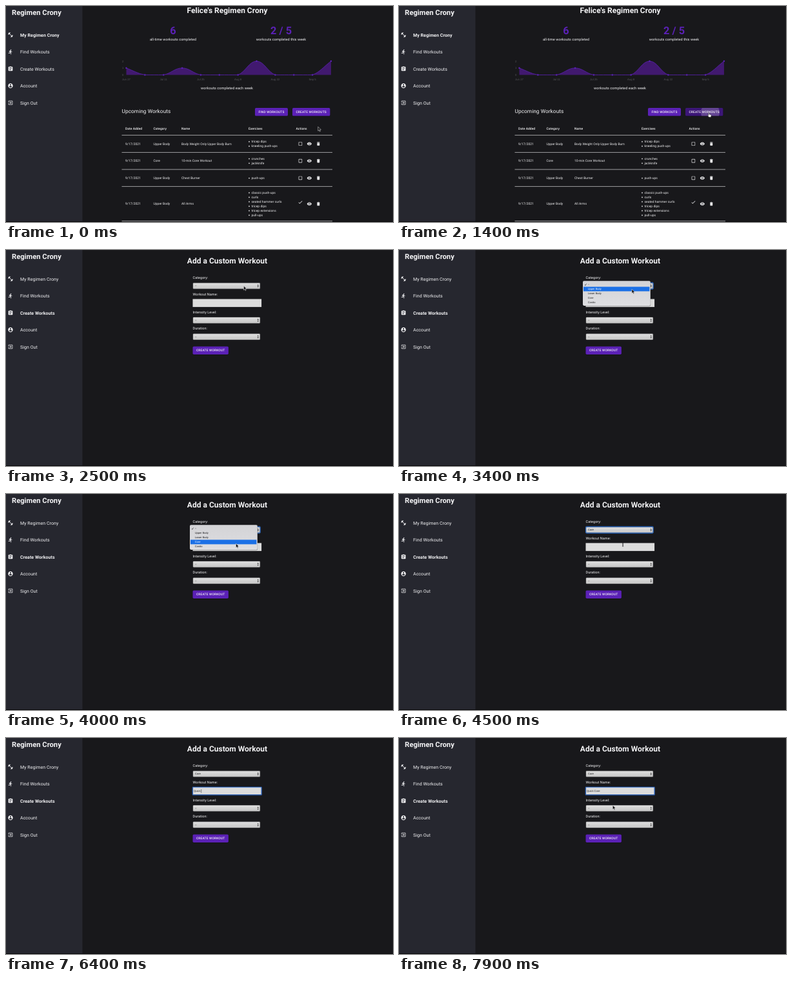
Animation, 600 px wide and 337 px high, one loop 8 s. Source, as an HTML page:

```html
<!DOCTYPE html>
<html lang="en">
<head>
<meta charset="utf-8">
<title>Regimen Crony</title>
<style>
  html, body { margin: 0; width: 100%; height: 100%; overflow: hidden; background: #18181b; }
  svg { display: block; width: 100vw; height: 100vh; }
  text { font-family: Roboto, sans-serif; fill: #f4f4f6; letter-spacing: .0094em; text-rendering: geometricPrecision; white-space: pre; }
  .bold { font-weight: 700; letter-spacing: 0; }
  .item.on { font-weight: 700; }
  .head { font-weight: 500; }
  .mid { text-anchor: middle; }
  .stat { font-weight: 700; fill: #5b21b6; letter-spacing: 0; text-anchor: middle; }
  .btn { font-weight: 500; letter-spacing: .0286em; text-anchor: middle; }
  .tick { font-family: "Liberation Sans", Arial, sans-serif; fill: #56565b; letter-spacing: 0; text-anchor: middle; }
  .ui { font-family: "Liberation Sans", Arial, sans-serif; fill: #1c1c1e; letter-spacing: 0; }
  .ui.pick { fill: #fff; }
</style>
</head>
<body>
<svg id="stage" viewBox="0 0 600 337" preserveAspectRatio="none">
  <defs>
    <linearGradient id="gray" x2="0" y2="1"><stop stop-color="#dfdfdf"/><stop offset="1" stop-color="#c6c6c6"/></linearGradient>
    <linearGradient id="panel" x2="0" y2="1"><stop stop-color="#d3d3d6"/><stop offset="1" stop-color="#dedee1"/></linearGradient>
    <clipPath id="btnClip"><rect x="444" y="159" width="58.4" height="12.6" rx="1.7"/></clipPath>
  </defs>
  <rect width="600" height="337" fill="#18181b"/>
  <rect width="118.5" height="337" fill="#26272f"/>
  <g id="side"></g>
  <g id="dash"></g>
  <g id="form"></g>
  <rect y="336" width="600" height="1" fill="#09090b"/>
  <rect id="scroll" x="599" y="8" width="1" height="328" fill="#424246"/>
  <g id="cursor">
    <path id="arrow" d="M0 0V6.4L1.5 5.1 2.5 7.4 3.6 6.9 2.6 4.6H4.6Z" fill="#0c0c0e" stroke="#e4e4e6" stroke-width=".55"/>
    <path id="hand" d="M-.6 .3Q0-.5.6.3V2.4L3 2.9Q3.9 3.2 3.8 4.2L3.2 6.9H.1L-1.9 4.2Q-2 3.3-.6 4Z" fill="#f2f2f4" stroke="#111" stroke-width=".45"/>
    <path id="beam" d="M-1.1-2.7Q0-2.7 0-2V2Q0 2.7-1.1 2.7M1.1-2.7Q0-2.7 0-2V2Q0 2.7 1.1 2.7" fill="none" stroke="#1b1b1d" stroke-width=".6"/>
  </g>
</svg>
<script>
const $ = id => document.getElementById(id);
const text = (x, mid, size, str, cls = '', id = '') =>
  `<text x="${x}" y="${mid + size * .36}" font-size="${size}" class="${cls}" id="${id}">${str}</text>`;
const rect = (x, y, w, h, fill, more = '') =>
  `<rect x="${x}" y="${y}" width="${w}" height="${h}" fill="${fill}" ${more}/>`;
const icon = (d, x, y, size) =>
  `<path d="${d}" fill="#f4f4f6" transform="translate(${x - size / 2} ${y - size / 2}) scale(${size / 24})"/>`;
const button = (x, y, w, label, id = '') =>
  rect(x, y + .6, w, 12.6, '#0d0d10', 'rx="1.7" opacity=".6"') +
  rect(x, y, w, 12.6, '#5b21b6', `rx="1.7" id="${id}"`) +
  text(x + w / 2, y + 6.3, 4.92, label, 'btn');

const icons = {
  gym: 'M20.57 14.86L22 13.43 20.57 12 17 15.57 8.43 7 12 3.43 10.57 2 9.14 3.43 7.71 2 5.57 4.14 4.14 2.71 2.71 4.14l1.43 1.43L2 7.71l1.43 1.43L2 10.57 3.43 12 7 8.43 15.57 17 12 20.57 13.43 22l1.43-1.43L16.29 22l2.14-2.14 1.43 1.43 1.43-1.43-1.43-1.43L22 16.29z',
  run: 'M13.49 5.48c1.1 0 2-.9 2-2s-.9-2-2-2-2 .9-2 2 .9 2 2 2zm-3.6 13.9l1-4.4 2.1 2v6h2v-7.5l-2.1-2 .6-3c1.3 1.5 3.3 2.5 5.5 2.5v-2c-1.9 0-3.5-1-4.3-2.4l-1-1.6c-.4-.6-1-1-1.7-1-.3 0-.5.1-.8.1l-5.2 2.2v4.7h2v-3.4l1.8-.7-1.6 8.1-4.9-1-.4 2 7 1.4z',
  list: 'M19 3h-4.18C14.4 1.84 13.3 1 12 1c-1.3 0-2.4.84-2.82 2H5c-1.1 0-2 .9-2 2v14c0 1.1.9 2 2 2h14c1.1 0 2-.9 2-2V5c0-1.1-.9-2-2-2zm-7 0c.55 0 1 .45 1 1s-.45 1-1 1-1-.45-1-1 .45-1 1-1zm2 14H7v-2h7v2zm3-4H7v-2h10v2zm0-4H7V7h10v2z',
  user: 'M12 2C6.48 2 2 6.48 2 12s4.48 10 10 10 10-4.48 10-10S17.52 2 12 2zm0 3c1.66 0 3 1.34 3 3s-1.34 3-3 3-3-1.34-3-3 1.34-3 3-3zm0 14.2c-2.5 0-4.71-1.28-6-3.22.03-1.99 4-3.08 6-3.08 1.99 0 5.97 1.09 6 3.08-1.29 1.94-3.5 3.22-6 3.22z',
  exit: 'M10.09 15.59L11.5 17l5-5-5-5-1.41 1.41L12.67 11H3v2h9.67l-2.58 2.59zM19 3H5c-1.11 0-2 .9-2 2v4h2V5h14v14H5v-4H3v4c0 1.1.89 2 2 2h14c1.1 0 2-.9 2-2V5c0-1.1-.9-2-2-2z',
  eye: 'M12 4.5C7 4.5 2.73 7.61 1 12c1.73 4.39 6 7.5 11 7.5s9.27-3.11 11-7.5c-1.73-4.39-6-7.5-11-7.5zM12 17c-2.76 0-5-2.24-5-5s2.24-5 5-5 5 2.24 5 5-2.24 5-5 5zm0-8c-1.66 0-3 1.34-3 3s1.34 3 3 3 3-1.34 3-3-1.34-3-3-3z',
  bin: 'M6 19c0 1.1.9 2 2 2h8c1.1 0 2-.9 2-2V7H6v12zM19 4h-3.5l-1-1h-5l-1 1H5v2h14V4z',
  box: 'M19 5v14H5V5h14m0-2H5c-1.1 0-2 .9-2 2v14c0 1.1.9 2 2 2h14c1.1 0 2-.9 2-2V5c0-1.1-.9-2-2-2z',
  tick: 'M9 16.17L4.83 12l-1.42 1.41L9 19 21 7l-1.41-1.41z'
};

// Sidebar
const menu = [['gym', 'My Regimen Crony'], ['run', 'Find Workouts'], ['list', 'Create Workouts'], ['user', 'Account'], ['exit', 'Sign Out']];
$('side').innerHTML = text(9, 10.2, 11.2, 'Regimen Crony', 'bold') + menu.map(([name, label], i) => {
  const y = 45 + i * 26.5;
  return icon(icons[name], 7, y, 8.8) + text(22, y, 7, label, 'item', 'item' + i);
}).join('');

// Weekly chart: smooth curve whose handles never leave the plot
function chart() {
  const pts = [1, 0, 0, 1, 0, 0, 0, 2, 0, 0, 0, 2].map((v, i) => [186.5 + i * 28.86, 107.5 - v * 10.7]);
  const at = i => pts[Math.max(0, Math.min(pts.length - 1, i))];
  const handle = (i, dir) => {
    const a = at(i - 1), b = at(i + 1), p = pts[i];
    const k = (a === p || b === p ? .4 : .2) * dir;
    return [p[0] + k * (b[0] - a[0]), Math.min(107.5, Math.max(86, p[1] + k * (b[1] - a[1])))];
  };
  let d = 'M' + pts[0];
  for (let i = 1; i < pts.length; i++) d += `C${handle(i - 1, 1)} ${handle(i, -1)} ${pts[i]}`;
  const days = ['Jun 27', 'Jul 11', 'Jul 25', 'Aug 8', 'Aug 22', 'Sep 5'];
  return `<path d="${d}V107.5H186.5Z" fill="#41196f"/><path d="${d}" fill="none" stroke="#5420a3" stroke-width=".9"/>` +
    pts.map(p => `<circle cx="${p[0]}" cy="${p[1]}" r="1.25" fill="#5b21b6"/>`).join('') +
    days.map((day, i) => text(186.5 + i * 57.72, 114, 4.3, day, 'tick')).join('') +
    [0, 1, 2].map(v => text(181.3, 107.5 - v * 10.7, 4.3, v, 'tick')).join('');
}

// Table
const rows = [
  [215, 'Upper Body', 'Body Weight Only Upper Body Burn', ['tricep dips', 'kneeling push-ups']],
  [241.6, 'Core', '10-min Core Workout', ['crunches', 'jackknife']],
  [268.4, 'Upper Body', 'Chest Burner', ['push-ups']],
  [308.7, 'Upper Body', 'All Arms', ['classic push-ups', 'curls', 'seated hammer curls', 'tricep dips', 'tricep extensions', 'pull-ups']]
];
const row = ([y, kind, name, moves], i) =>
  text(185, y, 4.95, '9/17/2021') + text(228.5, y, 4.95, kind) + text(272, y, 4.95, name) +
  moves.map((move, k) => {
    const my = y + (k - (moves.length - 1) / 2) * 7;
    return `<circle cx="377" cy="${my + .2}" r=".85" fill="#f4f4f6"/>` + text(380.4, my, 4.95, move);
  }).join('') +
  (i === 3 ? icon(icons.tick, 456.4, y - 2.5, 8.2) : icon(icons.box, 456.4, y, 7.4)) +
  icon(icons.eye, 470.3, y, 7.8) + icon(icons.bin, 484.3, y, 7.6);

$('dash').innerHTML =
  text(343, 6.6, 12, "Felice's Regimen Crony", 'bold mid') +
  text(259, 38.5, 16.4, '6', 'stat') + text(426.5, 38.5, 16.4, '2 / 5', 'stat') +
  text(259, 52.3, 5.6, 'all-time workouts completed', 'mid') +
  text(426.5, 52.3, 5.6, 'workouts completed this week', 'mid') +
  chart() +
  text(342.5, 128.3, 5.65, 'workouts completed each week', 'mid') +
  text(179.5, 164.3, 8.25, 'Upcoming Workouts') +
  button(386, 159, 51, 'FIND WORKOUTS') + button(444, 159, 58.4, 'CREATE WORKOUTS', 'create') +
  '<circle id="ripple" cx="482.5" cy="166" fill="#fff" opacity=".2" clip-path="url(#btnClip)"/>' +
  [[185, 'Date Added'], [228.5, 'Category'], [272, 'Name'], [376, 'Exercises'], [449.5, 'Actions']]
    .map(([x, label]) => text(x, 191.5, 4.95, label, 'head')).join('') +
  [201.7, 228.3, 255, 281.7, 335.4].map(y => rect(179.5, y - .35, 326.5, .7, '#d4d4d6')).join('') +
  rows.map(row).join('');

// Form
const select = (y, id = '') =>
  rect(290, y - 4.6, 103.8, 9.2, 'url(#gray)', 'rx="1" stroke="#8d8d90" stroke-width=".4"') +
  text(293, y, 4.1, '--', 'ui', id) +
  `<path d="M389.6 ${y - .6}l1.1-1.7 1.1 1.7zm0 1.2l1.1 1.7 1.1-1.7z" fill="#1c1c1e"/>`;
const options = ['--', 'Upper Body', 'Lower Body', 'Core', 'Cardio'];
const optTop = 50.4, optH = 7;

$('form').innerHTML =
  text(343, 17, 12, 'Add a Custom Workout', 'bold mid') +
  [[43, 'Category:'], [68.6, 'Workout Name:'], [96.8, 'Intensity Level:'], [122.4, 'Duration:']]
    .map(([y, label]) => text(289.5, y, 5.5, label)).join('') +
  select(56, 'category') + select(109.6) + select(135.4) +
  rect(289.6, 51, 104.6, 10, 'none', 'id="selRing" rx="1.4" stroke="#2d66b8" stroke-width="1.3"') +
  rect(289.5, 76.5, 106.6, 12.4, '#dcdcdc') +
  rect(289.4, 76.6, 106.8, 12.2, 'none', 'id="inRing" rx=".8" stroke="#2d5fb0" stroke-width="1.4"') +
  text(291, 82.8, 4.1, '', 'ui', 'typed') +
  rect(291, 80, .5, 5.6, '#222', 'id="caret"') +
  button(289.5, 150.4, 55.4, 'CREATE WORKOUT') +
  '<g id="drop">' +
  rect(284.6, 48.6, 105.6, 39.2, '#000', 'rx="2" opacity=".35"') +
  rect(285, 48.3, 104.8, 38.6, 'url(#panel)', 'rx="1.8"') +
  rect(286, optTop, 102.4, optH, '#1b70e6', 'id="hilite"') +
  '<path id="check" d="M288 54l.9 1.3 1.7-2.8" fill="none" stroke="#1c1c1e" stroke-width=".6"/>' +
  options.map((o, i) => text(292.7, optTop + optH * (i + .5), 4, o, 'ui', 'opt' + i)).join('') +
  '</g>';

// Pointer stops: time, x, y
const path = [
  [0, 483.8, 188.4], [500, 483.5, 178], [900, 481.2, 169], [1400, 480.4, 166.6], [2000, 480.4, 166.8],
  [2100, 428, 115], [2200, 377, 70], [2300, 377, 70], [2400, 372, 62], [2500, 368.5, 56], [2700, 368, 55.4],
  [3200, 362, 60.4], [3400, 361, 61.2], [4000, 356.5, 77.3], [4300, 355.5, 77.3], [4800, 334.5, 82],
  [7500, 334.5, 82], [7600, 336, 84], [7900, 331.3, 105], [8000, 331.3, 105]
];
const keys = [5600, 5800, 6000, 6200, 6300, 6400, 6700, 7100, 7300, 7400];
const word = 'Quick Core';

function pointer(t) {
  const i = path.findIndex(p => p[0] > t);
  const [t0, x0, y0] = path[i - 1], [t1, x1, y1] = path[i];
  const k = (t - t0) / (t1 - t0);
  return [x0 + (x1 - x0) * k, y0 + (y1 - y0) * k];
}
const show = (id, on) => $(id).style.display = on ? '' : 'none';

function draw(t) {
  const home = t < 1500, [x, y] = pointer(t);
  show('dash', home);
  show('form', !home);
  show('scroll', !home && t < 2200);
  $('item0').classList.toggle('on', home);
  $('item2').classList.toggle('on', !home);

  const hover = home && y < 171.6;
  $('create').setAttribute('fill', hover ? '#3c1678' : '#5b21b6');
  $('ripple').setAttribute('r', home && t >= 1300 ? 7 + (t - 1300) * .075 : 0);

  const open = t >= 2700 && t < 4400;
  show('drop', open);
  show('selRing', t >= 2700 && t < 4800);
  const pick = Math.max(0, Math.min(4, Math.floor((y - optTop) / optH)));
  $('hilite').setAttribute('y', optTop + pick * optH);
  options.forEach((o, i) => $('opt' + i).classList.toggle('pick', i === pick));
  $('check').setAttribute('stroke', pick ? '#1c1c1e' : '#fff');
  $('category').textContent = t >= 4400 ? 'Core' : '--';

  const count = keys.filter(k => k <= t).length;
  $('typed').textContent = word.slice(0, count);
  show('inRing', t >= 4800);
  show('caret', t >= 4800 && t < 7600 && !(t >= 5400 && t < 5600));
  $('caret').setAttribute('x', 291 + (count ? $('typed').getComputedTextLength() : 0));

  const beam = t >= 4500 && y > 76.5 && y < 89;
  show('cursor', t < 5600 || t >= 7600);
  show('hand', hover);
  show('beam', beam);
  show('arrow', !hover && !beam);
  $('cursor').setAttribute('transform', `translate(${x} ${y})`);
}

const start = performance.now();
function tick() {
  draw(Math.floor((performance.now() - start) % 8000 / 100) * 100);
  requestAnimationFrame(tick);
}
tick();
</script>
</body>
</html>
```
